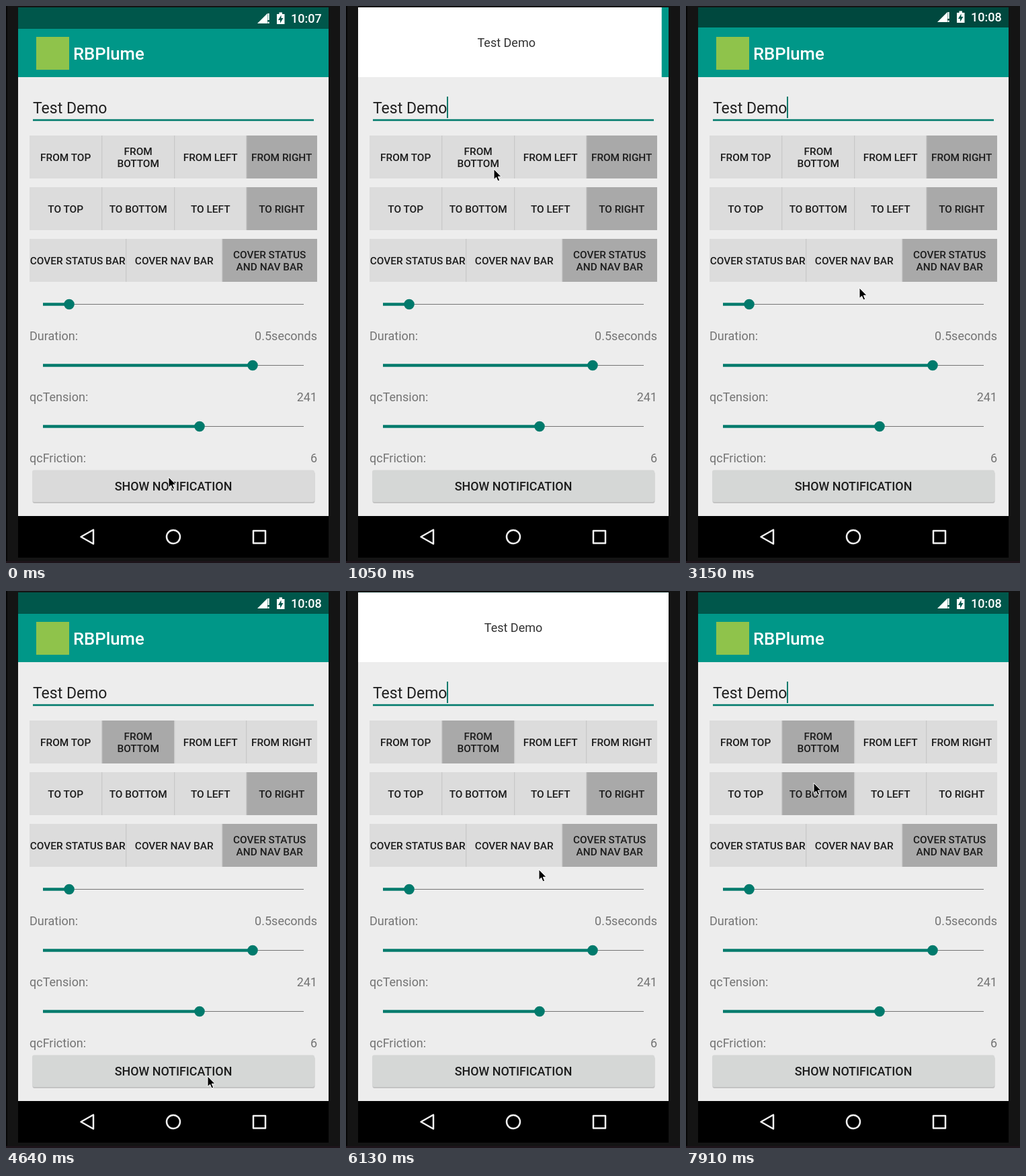
These frames come from a looping animation (497 by 830 pixels, 8 s). An HTML page:

```html
<!DOCTYPE html>
<html lang="en">
<head>
<meta charset="utf-8">
<title>Toast demo</title>
<style>
html, body { margin: 0; width: 100%; height: 100%; overflow: hidden; background: #141414; }
svg { display: block; width: 497px; height: 830px; font-family: Roboto, sans-serif; }
.mid { text-anchor: middle; }
.end { text-anchor: end; }
.med { font-weight: 500; }
</style>
</head>
<body>
<svg id="stage" viewBox="0 0 497 830">
  <defs>
    <clipPath id="screen"><rect x="18" y="2" width="462" height="820"/></clipPath>
    <clipPath id="header"><rect x="18" y="2" width="462" height="104"/></clipPath>
  </defs>
  <rect width="497" height="830" fill="#141414"/>
  <rect width="2" height="830" fill="#050505"/>
  <rect y="827" width="497" height="3" fill="#1d141a"/>
  <rect x="18" y="2" width="462" height="820" fill="#000"/>
  <rect x="18" y="106" width="462" height="654" fill="#ededed"/>
  <rect x="18" y="2" width="462" height="104" fill="#009788"/>
  <rect x="45" y="46" width="49" height="49" fill="#8fc34b"/>
  <text class="med" x="100" y="80" font-size="25.7" fill="#fff">RBPlume</text>

  <g clip-path="url(#screen)">
    <g id="status">
      <rect id="statusBg" x="18" y="0" width="462" height="34"/>
      <g fill="#fff">
        <path d="M374 26 L389 11 V26 Z"/>
        <path d="M389.5 11h2.2v10h-2.2zM389.5 23.5h2.2v2.5h-2.2z"/>
        <path d="M403 12h3.5v-2.5h4.500v2.500h3.500v15h-11.500z"/>
        <text class="med" x="424" y="25.300" font-size="18">10:<tspan id="minute">07</tspan></text>
      </g>
      <path d="M409.500 13.500l-4.500 7.500h3v4.500l4.500-7.500h-3z" fill="#00574b"/>
    </g>
  </g>

  <text x="40" y="160" font-size="23" fill="#212121">Test Demo</text>
  <rect x="40" y="168.700" width="418" height="2.600" fill="#007a6c"/>
  <rect id="caret" x="150" y="135" width="2" height="32" fill="#007a6c"/>

  <g id="controls"></g>

  <rect x="39.500" y="693.500" width="420" height="47.500" rx="3" fill="#c3c3c3"/>
  <rect id="show" x="39" y="691.500" width="420" height="47.500" rx="3"/>
  <text class="mid med" x="249" y="721.800" font-size="17.9" fill="#1c1c1c">SHOW NOTIFICATION</text>

  <g fill="none" stroke="#f2f2f2" stroke-width="2.500" stroke-linejoin="round">
    <path d="M111.500 791 L130 780.500 V801.500 Z"/>
    <circle cx="249" cy="791" r="10"/>
    <rect x="368" y="782" width="18" height="18.500"/>
  </g>

  <g clip-path="url(#header)">
    <g id="toast">
      <rect x="18" y="2" width="462" height="104" fill="#fff"/>
      <text class="mid" x="249" y="61" font-size="18" fill="#333">Test Demo</text>
    </g>
  </g>

  <path id="pointer" d="M0 0V15.500L3.600 12.300L6 18L8.700 17L6.300 11.300H11Z"
        fill="#000" stroke="#fff" stroke-width="1" stroke-linejoin="round"/>
</svg>
<script>
const LOOP = 8000, STEP = 149.2;
const $ = id => document.getElementById(id);
const controls = $('controls');

function add(tag, attrs, text) {
  const el = document.createElementNS('http://www.w3.org/2000/svg', tag);
  for (const key in attrs) el.setAttribute(key, attrs[key]);
  if (text) el.textContent = text;
  controls.append(el);
  return el;
}

function toggleRow(y, edges, labels) {
  return labels.map((label, i) => {
    const x = edges[i], width = edges[i + 1] - x;
    const cell = add('rect', { x, y, width, height: 64 });
    if (i) add('rect', { x: x - 1, y, width: 1.3, height: 64, fill: '#c9c9c9' });
    const lines = label.split('\n');
    lines.forEach((line, j) => add('text', {
      class: 'mid med', x: x + width / 2 - 0.3,
      y: y + 38.3 + (j - (lines.length - 1) / 2) * 18,
      'font-size': 15.4, fill: '#1c1c1c'
    }, line));
    return cell;
  });
}

function slider(y, thumb, name, value) {
  add('rect', { x: thumb, y: y - 0.5, width: 443 - thumb, height: 1, fill: '#747474' });
  add('rect', { x: 55, y: y - 2.2, width: thumb - 55, height: 4.4, fill: '#007a6c' });
  add('circle', { cx: thumb, cy: y, r: 7.8, fill: '#007a6c' });
  add('text', { x: 35, y: y + 53, 'font-size': 18, fill: '#747474' }, name);
  add('text', { class: 'end', x: 463, y: y + 53, 'font-size': 18, fill: '#747474' }, value);
}

const quarters = [35, 143, 251, 358, 463];
const from = toggleRow(193, quarters, ['FROM TOP', 'FROM\nBOTTOM', 'FROM LEFT', 'FROM RIGHT']);
const to = toggleRow(270, quarters, ['TO TOP', 'TO BOTTOM', 'TO LEFT', 'TO RIGHT']);
const cover = toggleRow(347, [35, 179, 322, 463],
  ['COVER STATUS BAR', 'COVER NAV BAR', 'COVER STATUS\nAND NAV BAR']);
slider(444.5, 94, 'Duration:', '0.5seconds');
slider(535.5, 367, 'qcTension:', '241');
slider(626.5, 288, 'qcFriction:', '6');

function select(cells, active) {
  cells.forEach((cell, i) => cell.setAttribute('fill', i === active ? '#a9a9a9' : '#dcdcdc'));
}

// Remaining displacement of a spring, from tension 241 and friction 6
const tension = (241 - 30) * 3.62 + 194, decay = ((6 - 8) * 3 + 25) / 2;
const omega = Math.sqrt(tension - decay * decay);
const spring = t => t < 0 ? 1 :
  Math.exp(-decay * t) * (Math.cos(omega * t) + decay / omega * Math.sin(omega * t));

function toastOffset(t) {
  if (t < 1.9) return [462 * spring(t - 0.69), 0];
  if (t < 4.5) return [462 * (1 - spring(t - 1.9386)), 0];
  if (t < 6.4) return [0, 104 * spring(t - 5.49)];
  return [462 * (1 - spring(t - 6.4386)), 0];
}

// Pointer path: step, x, y
const path = [
  [0, 242, 702], [2, 242, 702], [3, 252, 560], [4, 269, 352], [5, 262, 300],
  [7, 220, 243], [10, 204, 231], [20, 204, 231], [21, 258, 420], [22, 268, 490],
  [24, 256, 558], [25, 256, 558], [26, 235, 420], [27, 212, 260], [28, 205, 232],
  [29, 215, 290], [30, 275, 560], [31, 300, 723], [36, 300, 722], [39, 314, 600],
  [40, 313, 518], [41, 287, 415], [43, 287, 415], [47, 230, 330], [51, 190, 286], [54, 190, 286]
];

function pointerAt(n) {
  const i = path.findIndex(p => p[0] > n);
  const [a, ax, ay] = path[i - 1], [b, bx, by] = path[i];
  const k = (n - a) / (b - a);
  return [ax + (bx - ax) * k, ay + (by - ay) * k];
}

const within = (n, a, b) => n >= a && n < b;
const move = (id, [x, y]) => $(id).setAttribute('transform', `translate(${x} ${y})`);
const show = (id, on) => $(id).setAttribute('visibility', on ? 'visible' : 'hidden');

function render(ms) {
  const n = Math.floor(ms / STEP);
  const entering = n === 21 || n === 51;
  move('toast', toastOffset(n * 0.15));
  move('pointer', pointerAt(n));
  move('status', [0, entering ? -2 : 0]);
  $('statusBg').setAttribute('fill', entering ? '#00483e' : '#00574b');
  $('minute').textContent = n < 13 ? '07' : '08';
  show('status', !within(n, 3, 21) && !within(n, 36, 51));
  show('caret', within(n, 5, 28) || n >= 35);
  const pressed = within(n, 1, 3) || within(n, 33, 36);
  $('show').setAttribute('fill', pressed ? '#c8c9c9' : n < 1 ? '#dadada' : '#d5d7d6');
  select(from, n < 28 ? 3 : 1);
  select(to, n < 52 ? 3 : 1);
  select(cover, 2);
}

function tick() {
  render(performance.now() % LOOP);
  requestAnimationFrame(tick);
}
tick();
</script>
</body>
</html>
```
